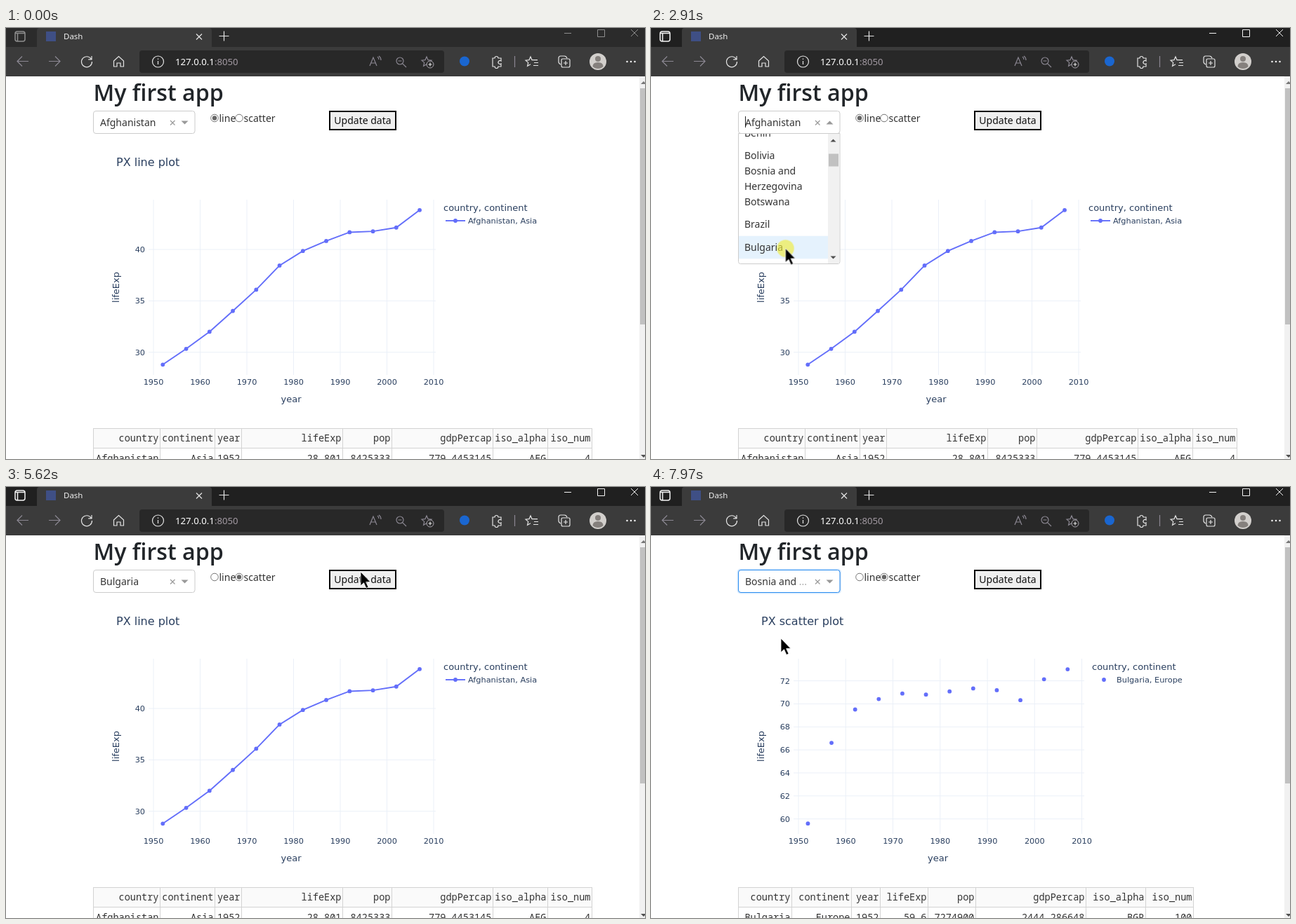
Animation, 910 px wide and 615 px high, one loop 8000 ms. Source, as an HTML page:

```html
<!DOCTYPE html>
<html lang="en">
<head>
<meta charset="utf-8">
<title>Dash</title>
<style>
html, body { margin: 0; width: 100%; height: 100%; overflow: hidden; background: #fff; }
svg { display: block; width: 910px; height: 615px; }
text { font: 14px "Noto Sans", sans-serif; fill: #333; white-space: pre; }
text.title { font: 600 32.2px "Open Sans", sans-serif; fill: #212529; }
text.plot { font: 11.3px "DejaVu Sans", sans-serif; fill: #2a3f5f; }
text.axis { font-size: 13px; }
text.head { font-size: 16px; }
text.mono { font: 13.55px "Noto Sans Mono", monospace; }
text.url { font-size: 13.2px; fill: #fff; }
.icon { fill: none; stroke: #e4e4e4; stroke-width: 1.2; }
.dim { stroke: #8b8792; }
.grid { stroke: #ebf0f8; fill: none; }

.bar, .win, .cursor, .modebar, .scroll, .thumb, .hover, .first, .second {
  animation: 8s linear infinite;
}
.bar { animation-name: bar; animation-timing-function: step-end; }
.win { animation-name: win; animation-timing-function: step-end; }
.cursor { animation-name: move; animation-timing-function: ease-in-out; }
.modebar { animation-name: modebar; }
.scroll { animation-name: scroll; }
.thumb { animation-name: thumb; }
.hover { animation-name: hover; animation-timing-function: step-end; }
.first { animation-name: first; animation-timing-function: step-end; }
.second { animation-name: second; animation-timing-function: step-end; }

@keyframes bar { 0% { fill: #2b2b2b } 16.3%, 100% { fill: #202020 } }
@keyframes win { 0% { stroke: #8e8e8e } 16.3%, 100% { stroke: #f4f4f4 } }
@keyframes move {
  0%, 2.5% { transform: translate(352px, 532px) }
  6.9%, 8.6% { transform: translate(360px, 265px) }
  14.75%, 19.5% { transform: translate(257px, 135px) }
  23.75%, 44.25% { transform: translate(191.5px, 314.5px) }
  50.6%, 62% { transform: translate(332px, 131px) }
  66.1%, 79.4% { transform: translate(505px, 121px) }
  82%, 84.5% { transform: translate(237px, 126px) }
  86.6%, 89.4% { transform: translate(251px, 136px) }
  93.5%, 100% { transform: translate(185px, 216px) }
}
@keyframes modebar {
  0%, 3.2% { opacity: 0 } 6.9%, 14.2% { opacity: 1 } 17.87%, 38.1% { opacity: 0 }
  40.9%, 49.8% { opacity: 1 } 53.6%, 100% { opacity: 0 }
}
@keyframes scroll {
  0%, 26.2% { transform: translateY(0) }
  26.21%, 26.9% { transform: translateY(-207px); animation-timing-function: ease-out }
  30%, 100% { transform: translateY(-344px) }
}
@keyframes thumb {
  0%, 26.2% { transform: translateY(0) }
  26.21%, 26.9% { transform: translateY(7px); animation-timing-function: ease-out }
  30%, 100% { transform: translateY(11.5px) }
}
@keyframes hover {
  0% { transform: translateY(0) }
  20.6% { transform: translateY(32.65px) }
  21.4% { transform: translateY(65.3px) }
  22.2% { transform: translateY(97.95px) }
  23% { transform: translateY(130.6px) }
  23.7% { transform: translateY(163.25px) }
  30.2% { transform: translateY(489.75px) }
  90.4% { transform: translateY(326.5px) }
  91.2% { transform: translateY(359.15px) }
  92.5%, 100% { transform: translateY(391.8px) }
}
@keyframes first { 0% { font-weight: 700 } 50%, 100% { font-weight: 400 } }
@keyframes second { 0% { font-weight: 400 } 50%, 100% { font-weight: 700 } }
</style>
</head>
<body>
<svg id="stage" viewBox="0 0 910 615"></svg>
<script>
const LOOP = 8000, ROW = 32.65;
const text = (x, y, s, cls = '', attrs = '') => `<text x="${x}" y="${y}" class="${cls}" ${attrs}>${s}</text>`;
const rect = (x, y, w, h, attrs) => `<rect x="${x}" y="${y}" width="${w}" height="${h}" ${attrs}/>`;
const circle = (x, y, r, attrs = '') => `<circle cx="${x}" cy="${y}" r="${r}" ${attrs}/>`;
const path = (d, attrs = '') => `<path d="${d}" ${attrs}/>`;
const icon = (x, y, d, cls = '') => path(d, `class="icon ${cls}" transform="translate(${x} ${y})"`);
const END = 'text-anchor="end"', MID = 'text-anchor="middle"';

// Wraps content that is shown only in the given [from, to) spans, in ms.
let showCount = 0, showRules = '';
function show(spans, content) {
  const name = 'show' + showCount++;
  const stops = ['0% { opacity: 0 }'];
  for (const [from, to] of spans) {
    stops.push(`${from * 100 / LOOP}% { opacity: 1 }`);
    stops.push(`${to * 100 / LOOP}% { opacity: ${to < LOOP ? 0 : 1} }`);
  }
  showRules += `@keyframes ${name} { ${stops.join(' ')} }
    .${name} { animation: ${name} 8s step-end infinite }\n`;
  return `<g class="${name}">${content}</g>`;
}

const star = 'M0-7l2 4.6 5 .5-3.7 3.3 1.1 4.9L0 3.8l-4.4 2.5 1.1-4.9L-7-1.9l5-.5z';

function browser() {
  return rect(0, 0, 910, 28, 'class="bar"')
    + path('M44 28V4q0-4 4-4H289q4 0 4 4V28z', 'fill="#3b3b3b"')
    + rect(0, 27, 910, 42, 'fill="#3b3b3b"')
    + rect(190, 32, 434, 32, 'rx="4" fill="#282828"')
    + `<g class="win" fill="none">`
    + path('M13 8q0-3 3-3h8q3 0 3 3v8q0 3-3 3h-8q-3 0-3-3zM13 7.5h14M16.5 8v11', 'stroke-width="1.5"')
    + path('M795 7.5h10M842.5 2.5h10v10h-10zM890 2l10 10M900 2l-10 10') + '</g>'
    + rect(57, 5, 14, 14, 'fill="#3f4f85"')
    + text(82, 16, 'Dash', '', 'style="font-size:11.5px;fill:#f0f0f0"')
    + icon(275, 12.5, 'M-4-4l8 8M4-4l-8 8') + icon(310.5, 11.5, 'M-7 0H7M0-7V7')
    + icon(24, 47.5, 'M8 0H-8M-1-7l-7 7 7 7', 'dim') + icon(69, 47.5, 'M-8 0H8M1-7l7 7-7 7', 'dim')
    + icon(115, 48, 'M6.5-3.5A7.5 7.5 0 1 0 7.5 0M7-8v4.8H2.2')
    + icon(160.5, 48, 'M-7-1L0-7.5 7-1V7H2.5V2h-5v5H-7z')
    + icon(216.5, 48, 'M-8 0a8 8 0 1 0 16 0a8 8 0 1 0-16 0M0-1v5M0-4.5v1.5')
    + text(241, 52.5, '127.0.0.1<tspan fill="#a39aa3">:8050</tspan>', 'url')
    + icon(526, 48, 'M-8 6l5-12 5 12M-6 2H0M3-7q2 1.5 2 4M5-8q3 2 3 6', 'dim')
    + icon(562, 47, 'M-6 0a5 5 0 1 0 10 0a5 5 0 1 0-10 0M2.8 3.8L8 9M-3.5 0h5', 'dim')
    + icon(599, 48, star, 'dim')
    + circle(604, 52, 5, 'fill="#282828" stroke="#a9a5ad"') + icon(604, 52, 'M-2.5 0h5M0-2.5v5')
    + circle(653, 47.5, 7, 'fill="#1a66d0"')
    + icon(699, 48, 'M-6-5h3a2.5 2.5 0 1 1 5 0h4v4a2.5 2.5 0 1 0 0 4v4h-4a2.5 2.5 0 1 1-5 0h-3z')
    + icon(724.5, 48, 'M0-8V8', 'dim')
    + icon(747, 48, 'M0 3.8l-4.4 2.5 1.1-4.9L-7-1.9l5-.5L0-7l2 4.6h8M5 1.5h6M4 5.5h7')
    + icon(795, 48, 'M-5 4q-3-1-3-4v-5q0-3 3-3h5q3 0 4 3M-4-2q0-2 2-2h8q2 0 2 2v8q0 2-2 2h-8q-2 0-2-2zM2-1v6M-1 2h6')
    + circle(843, 48, 12, 'fill="#d2cfcc"') + circle(843, 44, 4, 'fill="#85807d"')
    + path('M835.5 55q0-6 7.5-6t7.5 6q-3 3-7.5 3t-7.5-3z', 'fill="#85807d"')
    + [884.5, 890, 895.5].map(x => circle(x, 48, 1.3, 'fill="#eee"')).join('')
    + rect(902, 69, 8, 546, 'fill="#f1f1f1"') + rect(903, 86, 7, 337, 'fill="#c1c1c1"')
    + path('M904 80l4-4 4 4z', 'fill="#777"') + path('M904 609l4 4 4-4z', 'fill="#505050"');
}

// Line/scatter figure; x and y map data values to pixels.
function figure({ title, joined, life, decade, right, yTicks, yBase, yUnit, legendX, label }) {
  const x = year => 210 + (year - 1950) * decade / 10;
  const y = v => 316 - (v - yBase) * yUnit;
  const points = life.map((v, i) => [x(1952 + 5 * i), y(v)]);
  const blue = 'fill="#636efa"', line = 'fill="none" stroke="#636efa" stroke-width="1.9"';
  let out = text(157, 197, title, 'plot head');
  for (let year = 1950; year <= 2010; year += 10) {
    out += path(`M${x(year)} 245V495`, 'class="grid"') + text(x(year), 509, year, 'plot', MID);
  }
  for (const v of yTicks) {
    out += path(`M203 ${y(v)}H${right}`, 'class="grid"') + text(198, y(v) + 4, v, 'plot', END);
  }
  const mid = (203 + right) / 2 - 1.5;
  out += text(mid, 533.5, 'year', 'plot axis', MID)
    + text(0, 0, 'lifeExp', 'plot axis', `${MID} transform="translate(160.5 370) rotate(-90)"`);
  if (joined) out += path('M' + points.join('L'), line) + path('M626 275h28', line);
  out += points.map(([px, py]) => circle(px, py, 2.9, blue)).join('');
  const markX = joined ? 640 : 645;
  return out + circle(markX, 275, 2.9, blue)
    + text(legendX, 261, 'country, continent', 'plot axis') + text(legendX + 35, 279, label, 'plot');
}

function table(edges, values) {
  const names = ['country', 'continent', 'year', 'lifeExp', 'pop', 'gdpPercap', 'iso_alpha', 'iso_num'];
  const [left, last] = [edges[0], edges[8]];
  return rect(left, 571, last - left, 28, 'fill="#fafafa"')
    + path(`M${left} 571.5H${last}M${left} 599.5H${last}` + edges.map(e => `M${e - .5} 571V615`).join(''),
      'fill="none" stroke="#d3d3d3"')
    + names.map((n, i) => text(edges[i + 1] - 2.5, 590, n, 'mono', END)
      + text(edges[i + 1] - 2.5, 619, values[i], 'mono', END)).join('');
}

function modebar() {
  const icons = [
    [537, 'M-6-3.5h3l1.5-2h3l1.5 2h3V5H-6zM-2.5.5a2.5 2.5 0 1 0 5 0a2.5 2.5 0 1 0-5 0'],
    [588, 'M-6 0H6M0-6V6M-2-4l2-2 2 2M-2 4l2 2 2-2M-4-2l-2 2 2 2M4-2l2 2-2 2'],
    [611, 'M-6-6H6V6H-6z'],
    [633, 'M-3 3C-9-1-4-5 1-5s7 5 2 6-8 1-5 5'],
    [662, 'M-5-5H6V6H-5zM-2.5.5h6M.5-2.5v6'],
    [685, 'M-5-5H6V6H-5zM-2.5.5h6'],
    [708, 'M-6-6l12 12M6-6L-6 6M-6-2v-4h4M2-6h4v4M6 2v4H2M-2 6h-4V2'],
    [730, 'M-7 0l7-6 7 6M-4.5-1v6h3V2h3v3h3v-6']
  ];
  const draw = (x, d, color, w) => path(d, `transform="translate(${x} 168)" fill="none" stroke="${color}" stroke-width="${w}"`);
  return '<g class="modebar">' + icons.map(([x, d]) => draw(x, d, '#c7c7c7', 1.8)).join('')
    + draw(565, 'M-5-1a4 4 0 1 0 8 0a4 4 0 1 0-8 0M2 2l5 5M-3-1h4M-1-3v4', '#7c7c7c', 1.8)
    + rect(753, 161, 14, 14, 'fill="#b9bfca"') + '</g>';
}

const OPEN = [[1310, 3050], [7020, 7700]];
const CLOSED = [[0, 1310], [3050, 7020], [7700, LOOP]];

function controls() {
  const box = color => rect(124.5, 118.5, 144.5, 32, `rx="3.5" fill="#fff" stroke="${color}"`);
  const dot = x => circle(x, 128.5, 3.2, 'fill="#666"');
  return text(124.5, 104, 'My first app', 'title')
    + box('#ccc')
    + show([[3050, 4560], [7700, LOOP]],
      rect(123.5, 117.5, 146.5, 34, 'rx="4" fill="none" stroke="#007eff" stroke-opacity=".15" stroke-width="2"') + box('#2a8cf0'))
    + show([[0, 3050]], text(134, 140, 'Afghanistan'))
    + show([[3050, 7700]], text(134, 140, 'Bulgaria'))
    + show([[7700, LOOP]], text(134, 140, 'Bosnia and <tspan fill="#aaa">...</tspan>'))
    + path('M234 132l6.5 6.5M240.5 132l-6.5 6.5', 'stroke="#999" stroke-width="1.2"')
    + show(CLOSED, path('M249.5 132.5h10l-5 5z', 'fill="#999"'))
    + show(OPEN, path('M249.5 137.5h10l-5-5z', 'fill="#999"'))
    + show([[1310, 1840], [2340, 3050], [7020, 7520]], path('M134.5 126v16', 'stroke="#222"'))
    + [297, 332].map(x => circle(x, 128.5, 5.3, 'fill="#fff" stroke="#767676"')).join('')
    + show([[0, 4630]], dot(297)) + show([[4630, LOOP]], dot(332))
    + text(303.5, 134, 'line') + text(338.5, 134, 'scatter')
    + rect(461, 119, 94, 26, 'fill="#efefef" stroke="#000" stroke-width="2"')
    + text(508, 137, 'Update data', '', MID + ' style="fill:#111"');
}

function list() {
  const names = ['Afghanistan', 'Albania', 'Algeria', 'Angola', 'Argentina', 'Australia', 'Austria', 'Bahrain',
    'Bangladesh', 'Belgium', 'Benin', 'Bolivia', 'Bosnia and|Herzegovina', 'Botswana', 'Brazil', 'Bulgaria', 'Burkina Faso'];
  const weight = { Afghanistan: 'first', Bulgaria: 'second' };
  const rows = names.map((name, i) => {
    const lines = name.split('|'), y = 172.3 + i * ROW;
    return lines.map((s, k) => text(133, y + (k - (lines.length - 1) / 2) * 22.4, s, weight[name])).join('');
  }).join('');
  return show(OPEN, path('M124.5 150.5h144.5v183q0 3-3 3h-138.5q-3 0-3-3z', 'fill="#fff" stroke="#ccc"')
    + `<g clip-path="url(#listClip)"><g class="scroll">${rect(125, 151, 127, 32.5, 'class="hover" fill="#e5f2fd"')}${rows}</g></g>`
    + rect(252, 151, 16, 185, 'fill="#f1f1f1"')
    + rect(253, 168, 14, 18, 'class="thumb" fill="#c1c1c1"')
    + show([[0, 2096]], path('M255.5 162.5h8l-4-4z', 'fill="#a3a3a3"'))
    + show([[2096, LOOP]], path('M255.5 162.5h8l-4-4z', 'fill="#505050"'))
    + path('M255.5 325.5h8l-4 4z', 'fill="#505050"'));
}

function cursor() {
  return '<g class="cursor">'
    + show([[1310, 1430], [2910, 3050], [4560, 4630], [5490, 5560], [7020, 7150], [7630, 7700]],
      circle(0, 0, 12.3, 'fill="#f0ec3a" fill-opacity=".64"'))
    + show([[200, 290], [800, 1100], [1600, 3620], [3760, 6500], [7230, LOOP]],
      path('M0 0V20l4.5-4.2 3.4 7.6 3.2-1.4-3.4-7.4H14z', 'stroke="#fff" stroke-width=".8"'))
    + show([[290, 800], [3620, 3760]], path('M-10 0H10M0-10V10', 'stroke="#222"'))
    + show([[1100, 1600], [6500, 7230]],
      path('M0 0c1.3 0 1.8 1 1.8 2v4.5l5 1.2c1.5.4 2 1.3 1.8 2.8l-.8 5-1 3H-.7L-5 11.5c-.6-1 .6-2 1.8-1.2L-1.8 12V2C-1.8 1-1.3 0 0 0z'
        + 'M1.8 6v4M4.3 7v3M6.8 7.7v3', 'fill="#fff" stroke="#111" stroke-width="1.1"'))
    + '</g>';
}

const before = figure({
  title: 'PX line plot', joined: true, decade: 66.5, right: 612, yTicks: [30, 35, 40], yBase: 40, yUnit: 14.67,
  life: [28.801, 30.332, 31.997, 34.02, 36.088, 38.438, 39.854, 40.822, 41.674, 41.763, 42.129, 43.828],
  legendX: 623, label: 'Afghanistan, Asia'
}) + table([125, 220, 298, 336, 480, 550, 694, 772, 835],
  ['Afghanistan', 'Asia', 1952, 28.801, 8425333, 779.4453145, 'AFG', 4]);

const after = figure({
  title: 'PX scatter plot', joined: false, decade: 67.25, right: 617, yTicks: [60, 62, 64, 66, 68, 70, 72], yBase: 69.6, yUnit: 16.42,
  life: [59.6, 66.61, 69.51, 70.42, 70.9, 70.81, 71.08, 71.34, 71.19, 70.32, 72.14, 73.005],
  legendX: 628, label: 'Bulgaria, Europe'
}) + table([125, 201, 286, 327, 395, 463, 620, 705, 773],
  ['Bulgaria', 'Europe', 1952, 59.6, 7274900, 2444.286648, 'BGR', 100]);

document.getElementById('stage').innerHTML =
  `<clipPath id="listClip">${rect(125, 151, 127, 185, '')}</clipPath>`
  + browser() + show([[0, 5750]], before) + show([[5750, LOOP]], after)
  + modebar() + controls() + list() + cursor();
document.head.appendChild(document.createElement('style')).textContent = showRules;
</script>
</body>
</html>
```
